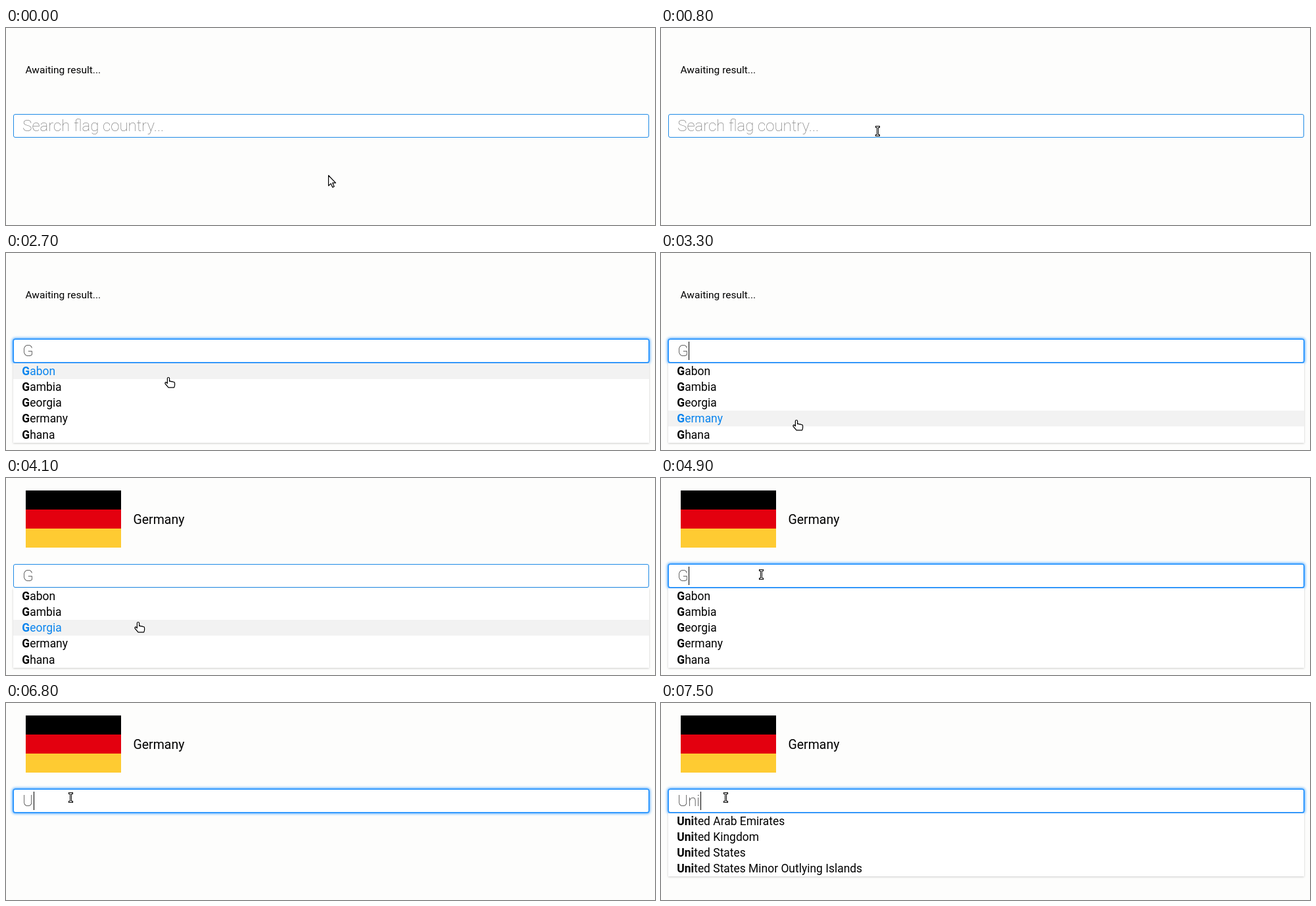
Write an HTML page that moves like this. It is 987 by 300 pixels and loops after 8 s.

```html
<!DOCTYPE html>
<html lang="en">
<head>
<meta charset="utf-8">
<title>Flag search</title>
<style>
  html, body { margin: 0; width: 100%; height: 100%; overflow: hidden; background: #fdfdfc; }
  #stage { position: absolute; left: 0; top: 0; width: 987px; height: 300px; overflow: hidden; }
  #field, #list, svg { position: absolute; box-sizing: border-box; }
  #field {
    left: 11px; top: 131px; width: 967px; height: 36px;
    border: 1px solid #1f8ae6; border-radius: 3px; background: #fff;
  }
  #field.focus { border-color: #1e90ff; box-shadow: 0 0 0 .6px #1e90ff, 0 0 4px 1px #1e90ff; }
  #list { left: 11px; top: 167.5px; width: 967px; background: #fff; box-shadow: 0 1px 3px rgba(0, 0, 0, .2); }
  svg { left: 0; top: 0; }
  text { font-family: Roboto, sans-serif; fill: #000; white-space: pre; }
  #wait { font-size: 15.5px; }
  #name { font-size: 19.5px; }
  #hint, #typed { font-size: 24px; font-weight: 100; }
  #hint { fill: #757575; }
  #typed { fill: #111; }
  #rows text { font-size: 17.45px; }
  #rows .on text { fill: #0a84ee; }
  #rows rect { fill: none; }
  #rows .on rect { fill: #f2f2f2; }
  .match { font-weight: 700; }
  .shape { fill: #fff; stroke: #000; stroke-width: 1.2; stroke-linejoin: round; }
</style>
</head>
<body>
<div id="stage">
  <div id="field"></div>
  <div id="list"></div>
  <svg width="987" height="300" viewBox="0 0 987 300">
    <text id="wait" x="29.5" y="69">Awaiting result...</text>
    <g id="result">
      <rect x="30" y="19" width="145" height="29" fill="#000"/>
      <rect x="30" y="48" width="145" height="29" fill="#e3000f"/>
      <rect x="30" y="77" width="145" height="29" fill="#fecb32"/>
      <text id="name" x="193.5" y="70">Germany</text>
    </g>
    <text id="hint" x="25.2" y="157">Search flag country...</text>
    <text id="typed" x="25.2" y="157"></text>
    <g id="rows"></g>
    <rect id="caret" y="135" width="1" height="28"/>
    <g id="cursor">
      <path id="arrow" class="shape" d="M.5 .5V16.2L4.1 12.9L6.6 18.6L9.1 17.5L6.7 11.9H11.4Z"/>
      <g id="beam" fill="none">
        <path d="M-3.5 -6.5H3.5M-3.5 6.5H3.5M0 -6.5V6.5" stroke="#000" stroke-width="3"/>
        <path d="M-2.5 -6.5H2.5M-2.5 6.5H2.5M0 -6.5V6.5" stroke="#fff"/>
      </g>
      <path id="hand" class="shape" d="M-1.6 9.5V2Q-1.6 .5 0 .5T1.6 2V6.5Q3 5.5 4.3 7Q5.8 6 7 7.5Q9.6 7 9.6 9.5V12Q9.6 14 8.6 15.8H0L-4.9 10Q-5.6 8 -3.6 7.8Z"/>
    </g>
  </svg>
</div>
<script>
  const LOOP = 8000, TICK = 100;
  const TOP = 167.5, ROW = 24.2, TEXT_X = 25.2;
  const SVG = 'http://www.w3.org/2000/svg';
  const $ = id => document.getElementById(id);

  const countries = ['Gabon', 'Gambia', 'Georgia', 'Germany', 'Ghana', 'Uganda', 'Ukraine',
    'United Arab Emirates', 'United Kingdom', 'United States', 'United States Minor Outlying Islands'];

  // Each step: start time, then its values
  const typing = [[0, ''], [1800, 'G'], [5700, ''], [6800, 'U'], [7100, 'Un'], [7400, 'Uni']];
  const queries = [[0, ''], [1900, 'G'], [5900, ''], [6900, 'U'], [7200, 'Un'], [7500, 'Uni']];
  const fades = [[0, 0], [1900, .5], [2000, 1], [5800, .5], [5900, 0], [6900, .5], [7000, 1]];
  const focus = [[0, false], [900, true], [3700, false], [4900, true]];
  const blink = [[0, false], [900, true], [1500, false], [1800, true], [2400, false], [3000, true],
    [3700, false], [4900, true], [5500, false], [6100, true], [6700, false], [6800, true]];
  const path = [[0, 490, 224], [200, 490, 224], [500, 425, 203], [800, 329.5, 157], [2500, 329.5, 157],
    [2700, 247, 189], [2800, 226, 215], [3000, 208, 262], [3300, 206, 254], [3700, 206, 254],
    [4000, 203, 238], [4100, 201, 219], [4400, 211, 161], [4500, 212.5, 153], [4700, 200.5, 152],
    [4800, 200.5, 152], [4900, 152.5, 147], [5100, 98.5, 144], [LOOP, 98.5, 144]];

  const at = (steps, t) => steps.filter(s => s[0] <= t).pop()[1];

  function cursorAt(t) {
    const i = path.findIndex(p => p[0] > t);
    const [a, b] = [path[i - 1], path[i]];
    const k = (t - a[0]) / (b[0] - a[0]);
    return [1, 2].map(n => a[n] + (b[n] - a[n]) * k);
  }

  function add(parent, tag, attrs, content = '') {
    const el = document.createElementNS(SVG, tag);
    for (const key in attrs) el.setAttribute(key, attrs[key]);
    el.textContent = content;
    return parent.appendChild(el);
  }

  const show = (id, on) => { $(id).style.display = on ? '' : 'none'; };

  function drawList(query, hover) {
    const found = query ? countries.filter(c => c.startsWith(query)).slice(0, 5) : [];
    $('rows').replaceChildren();
    $('list').style.height = found.length * ROW + 'px';
    found.forEach((country, i) => {
      const row = add($('rows'), 'g', { class: i === hover ? 'on' : '' });
      add(row, 'rect', { x: 11, y: Math.round(TOP + i * ROW), width: 967, height: 24 });
      const label = add(row, 'text', { x: 24.3, y: Math.round(185.8 + i * ROW) });
      add(label, 'tspan', { class: 'match' }, query);
      add(label, 'tspan', {}, country.slice(query.length));
    });
  }

  function draw(t) {
    const text = at(typing, t), query = at(queries, t), fade = at(fades, t);
    const [x, y] = cursorAt(t);
    const overList = query && y >= TOP;
    const overField = y > 131 && y < TOP;

    show('wait', t < 3700);
    show('result', t >= 3700);
    $('field').className = at(focus, t) ? 'focus' : '';

    show('hint', !text);
    $('typed').textContent = text;
    show('caret', at(blink, t));
    const width = text ? $('typed').getComputedTextLength() : 0;
    $('caret').setAttribute('x', Math.ceil(TEXT_X + width));

    drawList(query, overList ? Math.floor((y - TOP) / ROW) : -1);
    $('list').style.opacity = $('rows').style.opacity = fade;

    show('arrow', !overList && !overField);
    show('beam', overField);
    show('hand', overList);
    $('cursor').setAttribute('transform', `translate(${x} ${y})`);
  }

  const start = performance.now();
  let last = -1;
  function frame() {
    const elapsed = Math.max(0, performance.now() - start) % LOOP;
    const t = Math.floor(elapsed / TICK) * TICK;
    if (t !== last) draw(last = t);
    requestAnimationFrame(frame);
  }
  frame();
</script>
</body>
</html>
```
